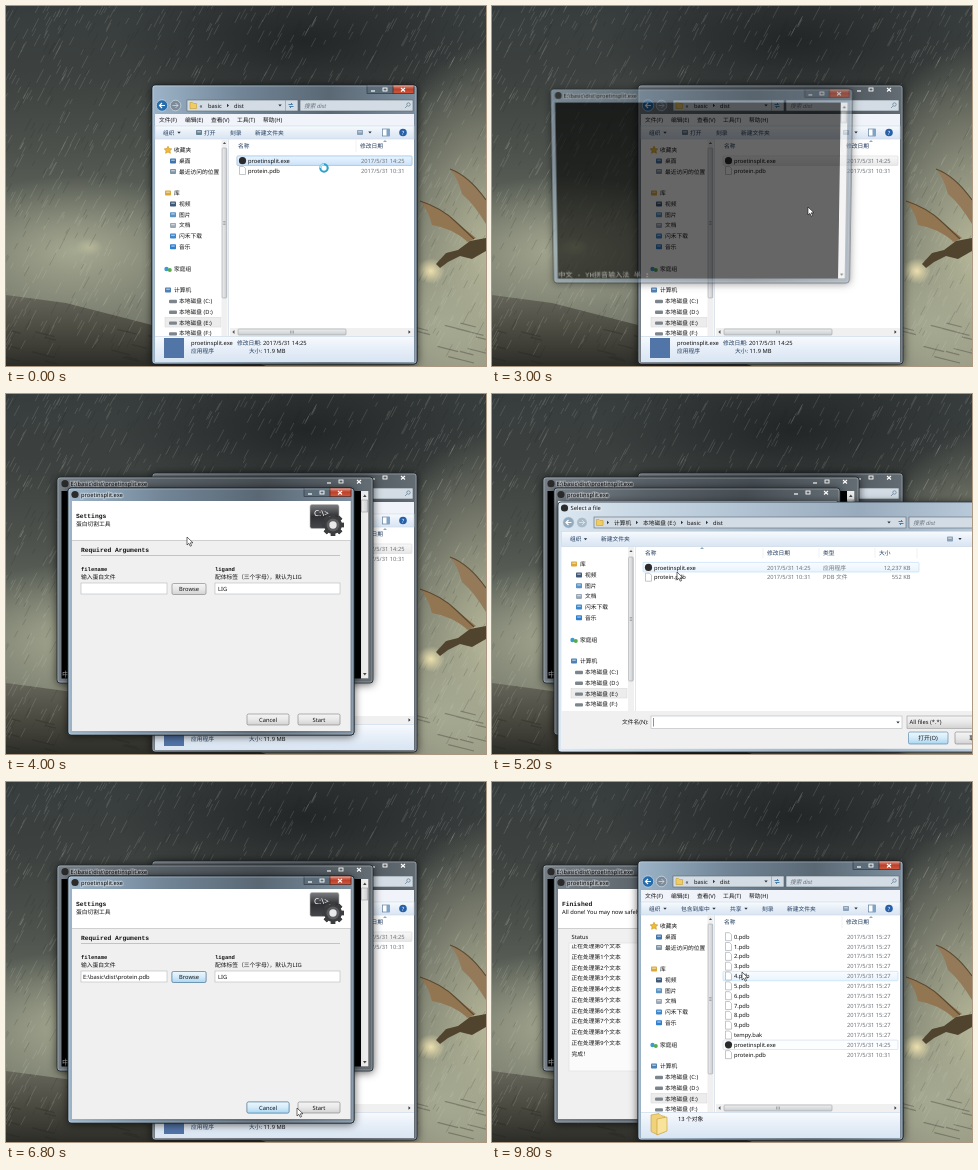
An HTML page that plays this animation: 480x360 px, repeating every 10000 ms.

```html
<!DOCTYPE html>
<html lang="zh">
<head>
<meta charset="utf-8">
<title>Desktop session</title>
<style>
html, body { margin: 0; width: 100%; height: 100%; overflow: hidden; background: #34383a; }
svg { position: absolute; left: 0; top: 0; width: 480px; height: 360px; transform-origin: 209px 186px; }
text { font: 5.75px "Noto Sans", "Noto Sans CJK SC", sans-serif; fill: #111; text-rendering: geometricPrecision; white-space: pre; }
.gray { fill: #6d7278; }
.navy { fill: #1e395b; }
.mono { font: bold 6.3px "Liberation Mono", monospace; }
.small { font-size: 5.5px; }
.ime { font: 7.6px "Liberation Mono", "Noto Sans CJK SC", monospace; fill: #c8c8c8; }
.mid { text-anchor: middle; }
.end { text-anchor: end; }
.hint { font-style: italic; fill: #66717c; }
.title { paint-order: stroke; stroke: rgba(255,255,255,.28); stroke-width: 2.5px; }
.shade { filter: drop-shadow(0 1px 4px rgba(0,0,0,.65)); }
</style>
</head>
<body>
<svg id="back" viewBox="0 0 480 360"></svg>
<svg id="console" viewBox="0 0 480 360"></svg>
<svg id="front" viewBox="0 0 480 360"></svg>
<script>
const rect = (x, y, w, h, fill, more = '') => `<rect x="${x}" y="${y}" width="${w}" height="${h}" fill="${fill}" ${more}/>`;
const path = (d, fill, more = '') => `<path d="${d}" fill="${fill}" ${more}/>`;
const disc = (x, y, r, fill, more = '') => `<circle cx="${x}" cy="${y}" r="${r}" fill="${fill}" ${more}/>`;
const text = (x, y, s, cls = '') => `<text x="${x}" y="${y}" class="${cls}">${s}</text>`;
const group = (id, body) => `<g id="${id}">${body}</g>`;
const edge = c => `stroke="${c}" stroke-width=".6"`;
const down = (x, y) => path(`M${x - 1.7} ${y - 1}h3.4l-1.7 2z`, '#26323e');
const right = (x, y) => path(`M${x - 1} ${y - 1.7}v3.4l2-1.7z`, '#26323e');
const appIcon = (x, y) => disc(x, y, 3.6, '#2b2b2b');
const page = (x, y) => path(`M${x} ${y}h4l2 2v6h-6z`, '#fff', edge('#9aa0a6'));
const folderIcon = (x, y) => path(`M${x} ${y}h2.5l1 1h3v5h-6.5z`, '#f0cd62', edge('#c79c34'));
const glyph = (x, y, fill) => rect(x - 3, y - 2.5, 6, 5, fill, 'rx=".8"') + rect(x - 1.8, y - 1.4, 3.6, 1.3, '#ffffff88');
const gradient = (id, dir, ...stops) => `<linearGradient id="${id}" x2="${dir === 'h' ? 1 : 0}" y2="${dir === 'h' ? 0 : 1}">` +
  stops.map((c, i) => `<stop offset="${i / (stops.length - 1)}" stop-color="${c}"/>`).join('') + '</linearGradient>';
const glow = (id, color) => `<radialGradient id="${id}"><stop stop-color="${color}"/><stop offset="1" stop-color="${color}" stop-opacity="0"/></radialGradient>`;
const ellipse = (x, y, rx, ry, fill) => `<ellipse cx="${x}" cy="${y}" rx="${rx}" ry="${ry}" fill="${fill}"/>`;

const defs = '<defs>' +
  gradient('sky', 'v', '#373c3d', '#3d4240', '#4c514c', '#62675d', '#75796b', '#7d8071') +
  gradient('ground', 'v', '#66655a', '#4b4a41', '#2d2d28') +
  gradient('glass', 'h', '#778088', '#596168', '#474e54', '#646d74') +
  gradient('glassOn', 'h', '#9db4c8', '#718597', '#5a6874', '#7d8f9f') +
  gradient('glassLight', 'h', '#dbe7f1', '#b9cad9', '#98abbc', '#c2d3e2') +
  gradient('bar', 'v', '#f8fbfe', '#e6eef8', '#d9e5f3') +
  gradient('red', 'v', '#dd9484', '#bd402b', '#cf5a3c') +
  gradient('button', 'v', '#f5f5f5', '#e8e8e8', '#d2d2d2') +
  gradient('buttonOn', 'v', '#edf7fd', '#d4ebfa', '#a9d6f2') +
  gradient('row', 'v', '#eaf4fe', '#cce3fa') +
  gradient('rowOff', 'v', '#f8f8f8', '#e8e8e8') +
  gradient('hover', 'v', '#fafcff', '#e8f3fd') +
  gradient('thumb', 'h', '#eeeeee', '#c9ccd0') +
  gradient('thumbH', 'v', '#eeeeee', '#c9ccd0') +
  gradient('metal', 'v', '#7b7d80', '#2e3033', '#46484b') +
  glow('pale', '#a6a991') + glow('bright', '#b6b799') + glow('dark', '#232627') + glow('fire', '#ecdfae') +
  '<clipPath id="logClip"><rect x="77" y="162" width="255" height="126"/></clipPath></defs>';

function wallpaper() {
  let seed = 7;
  const random = () => (seed = seed * 16807 % 2147483647) / 2147483647;
  const streaks = (count, top, height, length, slope) => {
    let d = '';
    for (let i = 0; i < count; i++) {
      const x = random() * 500, y = top + random() * height, n = length * (.4 + random());
      d += `M${x.toFixed(1)} ${y.toFixed(1)}l${(n * slope).toFixed(1)} ${n.toFixed(1)}`;
    }
    return d;
  };
  return rect(0, 0, 480, 360, 'url(#sky)') +
    ellipse(300, 35, 190, 80, 'url(#dark)') +
    ellipse(70, 245, 150, 75, 'url(#pale)') + ellipse(83, 241, 14, 9, 'url(#bright)') +
    ellipse(485, 250, 120, 215, 'url(#bright)') + ellipse(440, 320, 80, 70, 'url(#pale)') +
    path('M0 289L60 297 150 320 260 360H0z', 'url(#ground)') +
    path(streaks(45, 315, 40, 5, 4), 'none', 'stroke="#24241f" stroke-width="1.2" opacity=".3"') +
    path(streaks(1100, -10, 350, 10, -.52), 'none', 'stroke="#d3d8cd" stroke-width=".55" opacity=".27"') +
    path(streaks(500, -10, 350, 9, -.52), 'none', 'stroke="#1d2120" stroke-width=".7" opacity=".22"') +
    ellipse(425, 265, 14, 13, 'url(#fire)') +
    path('M444 163Q463 170 480 194V218Q468 198 456 188 452 172 444 163z', '#947a58') +
    path('M414 195Q436 202 450 216L470 232 462 236Q446 222 426 219 423 205 414 195z', '#927551') +
    path('M414 195Q436 202 450 216L468 233M444 163Q463 170 480 194', 'none', 'stroke="#5b4832" stroke-width="1.1"') +
    path('M430 258L440 247 452 244 464 235 480 232V245L466 253 454 250 442 256 434 262z', '#51442f');
}

// Window glass with caption buttons; the focus group is shown while the window is active.
function frame(id, x, y, w, h) {
  const r = x + w;
  const shape = (fill, more) => rect(x, y, w, h, fill, `rx="3" ${more}`);
  const glyphs = path(`M${r - 46} ${y + 6}h4`, 'none', 'stroke="#fff" stroke-width="1.2"') +
    rect(r - 34, y + 3, 4, 3, 'none', 'stroke="#fff" stroke-width=".9"') +
    path(`M${r - 16} ${y + 3}l4 3.5m0-3.5l-4 3.5`, 'none', 'stroke="#fff" stroke-width="1.1"');
  return shape('url(#glass)', 'class="shade" stroke="#1d262d" stroke-width=".8"') +
    group(id + 'Focus', shape('url(#glassOn)', 'stroke="#1b242c" stroke-width=".8"') +
      rect(r - 50, y, 27, 8.5, '#5d6c79', edge('#26313b')) + rect(r - 24, y, 21, 8.5, 'url(#red)', edge('#3e1712'))) +
    rect(x + 1, y + 1, w - 2, h - 2, 'none', 'rx="2" stroke="#ffffff66" stroke-width=".7"') + glyphs;
}

function scrollbar(x, y, h, top, size) {
  const mid = top + size / 2;
  return rect(x, y, 6, h, '#f0f0f1') + path(`M${x + 1.4} ${y + 5}h3.2l-1.6-2z`, '#555') +
    rect(x + .6, top, 4.6, size, 'url(#thumb)', 'rx="1" ' + edge('#a0a3a7')) +
    path(`M${x + 1.7} ${mid - 1.5}h2.4m-2.4 1.5h2.4m-2.4 1.5h2.4`, 'none', 'stroke="#777" stroke-width=".5"');
}

// Libraries, home group and drives, shared by both file views.
function places() {
  const libraries = ['视频', '图片', '文档', '闪禾下载', '音乐'];
  const tints = ['#3e5a78', '#5a93c4', '#9aa7b5', '#3f87cc', '#2f7fd0'];
  let s = glyph(162, 187, '#d9a93c') + text(168, 189, '库');
  libraries.forEach((name, i) => s += glyph(167, 198 + i * 10.7, tints[i]) + text(173, 200 + i * 10.7, name));
  s += disc(160.5, 263, 2.2, '#3f9ad0') + disc(163.8, 264, 2, '#56ab4a') + text(168, 265, '家庭组') +
    glyph(162, 284, '#4f80b4') + text(168, 286, '计算机') + rect(159, 311.5, 56, 9.5, '#ececec', edge('#d9d9d9'));
  [...'CDEF'].forEach((d, i) => s += rect(163, 293.8 + i * 10.8, 8, 3.4, '#7d858c', 'rx="1"') + text(173, 297 + i * 10.8, `本地磁盘 (${d}:)`));
  return s;
}

const navButtons = (x, y, a, b) => disc(x, y, 5.7, a, edge('#dfe9f2')) + disc(x + 13.5, y, 5.3, b, edge('#dfe9f2')) +
  path(`M${x + 3} ${y}h-5.5m2.5-2.5l-2.5 2.5 2.5 2.5`, 'none', 'stroke="#fff" stroke-width="1.2"') +
  path(`M${x + 10.5} ${y}h5.5m-2.5-2.5l2.5 2.5-2.5 2.5`, 'none', 'stroke="#ffffff88"');
const field = (x, y, w, h) => rect(x, y, w, h, '#d3dce4', edge('#59656f'));
const refresh = (x, y) => path(`M${x - 2.5} ${y - 1}h4l-1.5-1.5m2.5 3.5h-4l1.5 1.5`, 'none', 'stroke="#3574a5" stroke-width=".9"');

function explorer(id, tools, rows, selected, details) {
  const full = rows.length > 2;
  let s = frame(id, 146, 79, 265, 279) + navButtons(156, 99.5, '#276cab', '#7d8c98') +
    field(181, 94, 111, 11) + folderIcon(184, 96.5) + text(193.5, 101.5, '«') + text(202, 101.5, 'basic') + right(222, 99.5) +
    text(228, 101.5, 'dist') + down(274, 99.5) + path('M279.5 94v11', 'none', edge('#8795a1')) + refresh(285, 99.5) +
    field(294, 94, 113, 11) + text(298, 101.8, '搜索 dist', 'hint') +
    disc(402.5, 98.5, 1.7, 'none', edge('#4c6a85')) + path('M401 100l-2 2', 'none', edge('#4c6a85')) +
    rect(149, 108, 259, 248, '#fff') + rect(149, 108, 259, 12, '#f0f4fa') + rect(149, 120, 259, 13, 'url(#bar)', edge('#c8d5e4'));
  ['文件(F)', '编辑(E)', '查看(V)', '工具(T)', '帮助(H)'].forEach((m, i) => s += text(153 + i * 26, 116.3, m));
  for (const [x, label, arrow] of tools) s += text(x, 128.6, label, 'navy') + (arrow ? down(arrow, 126.7) : '');
  s += glyph(354, 126.5, '#8ba1b8') + down(364, 126.5) + rect(376.5, 123, 7, 7, '#fff', edge('#4c6c8c')) +
    rect(380.5, 123, 3, 7, '#7ea3c8') + disc(397, 126.5, 3.8, '#2860a8') + text(397, 128.5, '<tspan fill="#fff">?</tspan>', 'mid') +
    path('M162 140.2l1.2 2.4 2.6.3-1.9 1.8.5 2.6-2.4-1.3-2.4 1.3.5-2.6-1.9-1.8 2.6-.3z', '#f0bc35', edge('#c8901d')) +
    text(168, 146, '收藏夹') + glyph(167, 155, '#3f75ac') + text(173, 157, '桌面') +
    glyph(167, 165.5, '#8095a8') + text(173, 167.7, '最近访问的位置') + places() +
    scrollbar(215.5, 133, 197, 142, 150) + rect(222, 133, .8, 197, '#d6dfe9') +
    text(232, 142, '名称', 'navy') + text(354, 142, '修改日期', 'navy') + path('M377 136h4l-2-2z', '#8fa9c2') +
    path('M350 134v12', 'none', edge('#e3e8ee'));
  rows.forEach(([name, time], i) => {
    const y = 156.7 + i * 9.83;
    const mark = (fill, stroke) => rect(231, y - 6.7, 175, 9.4, fill, 'rx="1" ' + edge(stroke));
    if (i === selected) s += full ? mark('#fbfdff', '#cddae6') : mark('url(#rowOff)', '#d9d9d9') + group('rowFocus', mark('url(#row)', '#8dbce8'));
    if (full && i === 4) s += group('resultHover', mark('url(#hover)', '#b8daf5'));
    s += (name.endsWith('exe') ? appIcon(236.5, y - 2) : page(233.5, y - 6)) + text(242, y, name) + text(355, y, time, 'gray');
  });
  return s + rect(224, 322, 184, 8, '#f0f0f1') + rect(232, 323, 108, 6, 'url(#thumbH)', 'rx="1" ' + edge('#a0a3a7')) +
    path('M284.5 324.5v3m1.5-3v3m1.5-3v3', 'none', 'stroke="#777" stroke-width=".5"') +
    path('M228.5 324v4l-2.2-2z', '#555') + right(403.5, 326) +
    rect(149, 330, 259, 26, 'url(#bar)') + rect(149, 330, 259, .6, '#c9d6e5') + details;
}

const button = (x, y, label, id, w = 42) => rect(x, y, w, 11, 'url(#button)', 'rx="1.5" ' + edge('#7d7d7d')) +
  group(id, rect(x, y, w, 11, 'url(#buttonOn)', 'rx="1.5" ' + edge('#4b7f9f'))) + text(x + w / 2, y + 7.6, label, 'mid');
const input = (x, y, w, h) => rect(x, y, w, h, '#fff', edge('#b4b7bc'));

function consoleWindow() {
  return frame('console', 51, 83, 316, 206) + appIcon(59, 89.7) + text(64.5, 91.7, 'E:\\basic\\dist\\proetinsplit.exe', 'title') +
    rect(55.5, 97, 307, 187.5, '#000') + rect(355, 97, 7.5, 187.5, '#ececec') +
    path('M357 103h3.6l-1.8-2.4z', '#444') + path('M357 279h3.6l-1.8 2.4z', '#444') +
    rect(355.7, 106, 6, 12, 'url(#thumb)', edge('#999')) + text(56, 283, '中文 - YH拼音输入法 半 :', 'ime');
}

function settingsIcon() {
  let teeth = '';
  for (let a = 0; a < 360; a += 45) teeth += rect(324.8, 120, 4.4, 22, '#3c3d3f', `transform="rotate(${a} 327 131)"`);
  return rect(304, 110.5, 29, 24, 'url(#metal)', 'rx="2" ' + edge('#bbb')) +
    text(308, 121.5, '<tspan fill="#fff" font-size="8">C:\\&gt;_</tspan>') +
    disc(327, 131, 9, '#3c3d3f') + teeth + disc(327, 131, 6.5, '#5b5d60') + disc(327, 131, 3.7, '#e9e9e9');
}

function toolWindow() {
  const settings = text(70, 123.5, 'Settings', 'mono') + text(70, 131.7, '蛋白切割工具') + settingsIcon() +
    text(75, 158, 'Required Arguments', 'mono') + rect(75, 161, 259, .6, '#a5a5a5') +
    text(75, 177, 'filename', 'mono small') + text(209, 177, 'ligand', 'mono small') +
    text(75, 185.3, '输入蛋白文件') + text(209, 185.3, '配体标签（三个字母），默认为LIG') +
    input(75, 189, 86, 11) + group('chosen', text(77, 196.5, 'E:\\basic\\dist\\protein.pdb')) +
    button(166, 189.5, 'Browse', 'browseGlow', 34) + input(209, 189, 125, 11) + text(212, 196.5, 'LIG') +
    button(241, 320, 'Cancel', 'cancelGlow') + button(292, 320, 'Start', 'startGlow');
  let log = '';
  for (let i = 0; i < 11; i++) log += text(79.5, 166.2 + i * 10.75, i < 10 ? `正在处理第${i}个文本` : '完成！', 'log');
  const running = group('busyHead', text(70, 123.5, 'Running', 'mono') + text(70, 131.5, 'Please wait...')) +
    group('doneHead', text(70, 123.5, 'Finished', 'mono') + text(70, 131.5, 'All done! You may now safely close the program.')) +
    text(79.5, 157, 'Status') + rect(77, 161, 255, 128, '#fbfbfb', edge('#dedede')) + `<g clip-path="url(#logClip)">${log}</g>`;
  return frame('tool', 62, 94, 286, 247) + appIcon(69, 100.5) + text(75, 102.6, 'proetinsplit.exe', 'title') +
    rect(66, 107, 278.5, 230, '#f0f0f0') + rect(66, 107, 278.5, 39, '#fff') + rect(66, 146, 278.5, .6, '#b9b9b9') +
    group('settings', settings) + group('running', running);
}

function fileDialog() {
  const row = (y, name, type, time, size) => text(162, y, name) + text(275, y, time, 'gray') + text(331, y, type, 'gray') + text(418.5, y, size, 'gray end');
  return rect(66, 108, 450, 250, 'url(#glassLight)', 'rx="3" class="shade" stroke="#26323c" stroke-width=".8"') +
    appIcon(72.5, 114) + text(78.5, 116.2, 'Select a file', 'title') + navButtons(76.5, 128.5, '#91aabe', '#a9bccb') +
    field(102, 123, 312, 11) + folderIcon(104.5, 125.5) + right(116, 128.5) + text(122, 130.6, '计算机') + right(145, 128.5) +
    text(151, 130.6, '本地磁盘 (E:)') + right(190, 128.5) + text(195, 130.6, 'basic') + right(215, 128.5) + text(221, 130.6, 'dist') +
    down(397, 128.5) + refresh(409, 128.5) + field(417, 123, 90, 11) + text(421, 130.8, '搜索 dist', 'hint') +
    rect(69.5, 137.5, 420, 217, '#fff') + rect(69.5, 137.5, 420, 15, 'url(#bar)', edge('#c8d5e4')) +
    text(78, 147, '组织', 'navy') + down(93.5, 145.3) + text(109, 147, '新建文件夹', 'navy') + glyph(458, 145, '#8ba1b8') + down(468, 145) +
    `<g transform="translate(-80 -17)">${places()}</g>` + scrollbar(136, 153, 164, 163, 124) + rect(143, 153, .7, 164, '#d6dfe9') +
    text(153, 161.2, '名称', 'navy') + text(275, 161.2, '修改日期', 'navy') + text(331, 161.2, '类型', 'navy') + text(387, 161.2, '大小', 'navy') +
    path('M208 155h4l-2-2z', '#8fa9c2') + path('M271 154v10M327 154v10M383 154v10M425 154v10', 'none', edge('#e3e8ee')) +
    rect(151, 168.4, 276, 9.6, 'url(#hover)', 'id="dialogRow" rx="1" ' + edge('#b8daf5')) +
    appIcon(156.5, 173.4) + page(153.5, 179.2) +
    row(175.6, 'proetinsplit.exe', '应用程序', '2017/5/31 14:25', '12,237 KB') + row(185.4, 'protein.pdb', 'PDB 文件', '2017/5/31 10:31', '552 KB') +
    rect(69.5, 317, 420, 37.5, '#f0f0f0') + text(130, 330.3, '文件名(N):') + input(159, 322, 251, 12.5) +
    rect(161.5, 324, .5, 8.5, '#222') + down(406, 328.5) + group('typed', text(162.5, 330.3, 'protein.pdb')) +
    rect(415, 322, 90, 12.5, 'url(#button)', edge('#9a9a9a')) + text(417.5, 330.3, 'All files (*.*)') +
    rect(416.5, 338, 39.5, 12, 'url(#buttonOn)', 'rx="1.5" ' + edge('#4b7f9f')) + text(436, 346.2, '打开(O)', 'mid') +
    rect(463, 338, 40, 12, 'url(#button)', 'rx="1.5" ' + edge('#7d7d7d')) + text(483, 346.2, '取消', 'mid');
}

const early = '2017/5/31 10:31', built = '2017/5/31 14:25', late = '2017/5/31 15:27';
const program = ['proetinsplit.exe', built], protein = ['protein.pdb', early];
const outputs = Array.from({ length: 10 }, (_, i) => [i + '.pdb', late]);
const programDetails = rect(158, 332, 20, 20, '#5275a8') + text(185, 339.2, 'proetinsplit.exe') +
  text(231, 339.2, '<tspan class="navy">修改日期:</tspan> 2017/5/31 14:25') + text(185, 347.4, '应用程序', 'navy') +
  text(243, 347.4, '<tspan class="navy">大小:</tspan> 11.9 MB');
const countDetails = path('M159 333l8-1.5 2 2 4 1v15l-8 3-6-3z', '#efd27a', edge('#c39a3c')) +
  path('M165 337l10-2v14l-10 4z', '#f8e39c', edge('#c39a3c')) + text(186, 339.3, '13 个对象');

const $ = id => document.getElementById(id);
const show = (id, on) => { $(id).style.display = on ? '' : 'none'; };

$('back').innerHTML = defs + wallpaper() +
  group('folder', explorer('folder', [[157, '组织', 173], [198, '打开'], [224, '刻录'], [249, '新建文件夹']], [program, protein], 0, programDetails) + glyph(193, 126.5, '#6b8296'));
$('console').innerHTML = consoleWindow();
$('front').innerHTML = group('tool', toolWindow()) + group('dialog', fileDialog()) +
  group('results', explorer('results', [[157, '组织', 173], [189, '包含到库中', 222], [238, '共享', 254], [270, '刻录'], [295, '新建文件夹']],
    [...outputs, ['tempy.bak', late], program, protein], 11, countDetails)) +
  group('busy', disc(318, 162, 3.7, 'none', 'stroke="#2d9fca" stroke-width="2.1"') + path('M314.4 162a3.6 3.6 0 0 1 3.6-3.6', 'none', 'stroke="#a9e5f5" stroke-width="1.8"')) +
  group('pointer', path('M0 0V8l1.9-1.7 1.3 2.9 1.4-.6-1.3-2.8H6z', '#fff', 'stroke="#111" stroke-width=".6"'));
const logLines = [...document.querySelectorAll('.log')];

// Pointer stops: time, x, y.
const stops = [[2600, 316, 201], [3200, 316, 201], [4000, 181, 143], [4600, 183, 194], [5000, 184, 190], [5200, 185, 178],
  [5600, 185, 183], [5800, 185, 183], [6200, 436, 343], [6400, 425, 341], [6800, 291, 326], [7000, 312, 326],
  [8400, 312, 326], [8800, 380, 300], [9400, 300, 240], [9800, 250, 190]];

function pointerAt(t) {
  const i = stops.findIndex(s => s[0] >= t);
  const b = stops[i], a = stops[Math.max(0, i - 1)];
  const k = b === a ? 0 : (t - a[0]) / (b[0] - a[0]);
  return [a[1] + (b[1] - a[1]) * k, a[2] + (b[2] - a[2]) * k];
}

function draw(now) {
  const t = Math.floor(now % 10000 / 200) * 200;
  const during = (from, to = 10000) => t >= from && t < to;
  const opening = during(3000, 3200);
  const states = {
    folder: t < 8800, folderFocus: t < 1000, rowFocus: t < 1000, busy: t < 1400,
    console: during(3000), consoleFocus: t < 3800,
    tool: during(3800), toolFocus: t < 5000 || during(6400, 8800), settings: t < 7400, running: during(7400),
    busyHead: t < 8600, doneHead: during(8600), chosen: during(6400),
    browseGlow: during(6400), cancelGlow: during(6600, 7000), startGlow: during(7000),
    dialog: during(5000, 6400), typed: during(5800), results: during(8800), resultHover: during(9800), pointer: during(2600)
  };
  for (const id in states) show(id, states[id]);
  // The console tilts up into place as it fades in.
  $('console').style.transform = opening ? 'translate(.5px, -5px) perspective(936px) rotateX(-6deg) scale(.945)' : 'none';
  $('console').style.opacity = opening ? .6 : 1;
  $('dialogRow').setAttribute('y', t < 5400 ? 168.4 : 178.2);
  $('dialogRow').setAttribute('fill', t < 5800 ? 'url(#hover)' : 'url(#row)');
  logLines.forEach((line, i) => { line.style.display = i < (t - 7400) / 100 ? '' : 'none'; });
  $('pointer').setAttribute('transform', `translate(${pointerAt(t)})`);
  requestAnimationFrame(draw);
}
draw(performance.now());
</script>
</body>
</html>
```
